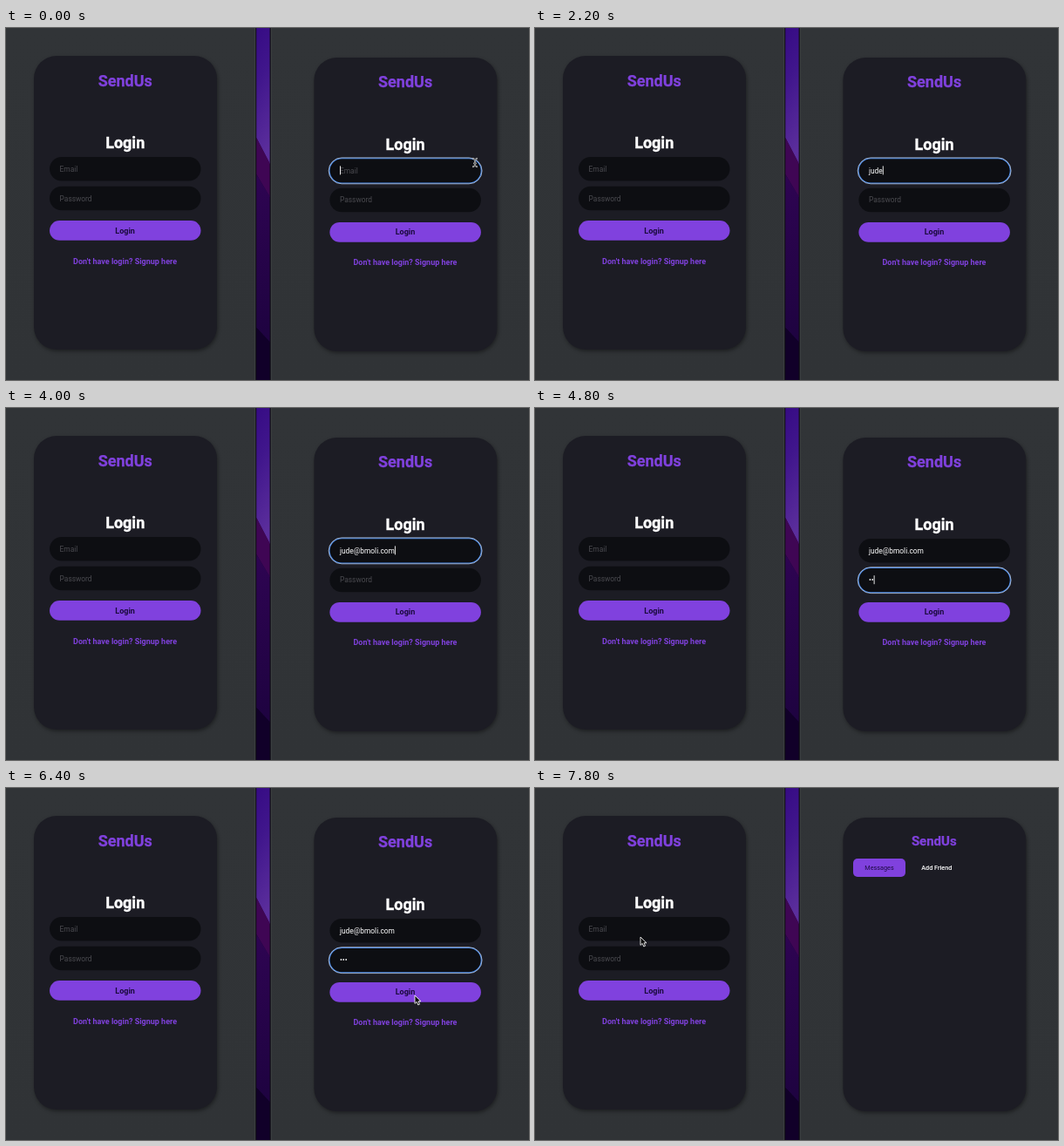
An HTML page for the animation above (8 s loop, 600x404 px).

```html
<!DOCTYPE html>
<html lang="en">
<head>
<meta charset="utf-8">
<title>Login</title>
<style>
  html, body { margin: 0; width: 100%; height: 100%; overflow: hidden; background: #303336; }
  svg { display: block; width: 600px; height: 404px; font-family: Roboto, Arial, sans-serif; }
  .mid { text-anchor: middle; }
  .bold { font-weight: 700; }
  .brand { fill: #8041de; font-size: 18px; stroke: #8041de; stroke-width: .25px; }
  .title { fill: #fff; font-size: 18px; stroke: #fff; stroke-width: .35px; }
  .label { fill: #190a3c; font-size: 9px; }
  .link { fill: #8041de; font-size: 9px; }
  .field { font-size: 8.4px; fill: #fff; }
  .field.empty { fill: #4b4b50; }
  .card { fill: #1c1c24; filter: drop-shadow(1px 2px 2px #0006); }
  .box { fill: #0d0e12; }
  .btn { fill: #8041de; }
  .tab { font-size: 7.25px; }
  .ring rect { fill: none; }
</style>
</head>
<body>
<svg viewBox="0 0 600 404">
  <defs>
    <linearGradient id="grey" x2="0" y2="1">
      <stop offset="0" stop-color="#313437"/>
      <stop offset="1" stop-color="#303336"/>
    </linearGradient>
    <linearGradient id="glow" x2=".15" y2="1">
      <stop offset="0" stop-color="#360b84"/>
      <stop offset=".4" stop-color="#40168c"/>
      <stop offset="1" stop-color="#5b2e9c"/>
    </linearGradient>
    <linearGradient id="dusk" x2="0" y2="1">
      <stop offset="0" stop-color="#2e0452"/>
      <stop offset="1" stop-color="#1e0340"/>
    </linearGradient>
  </defs>

  <rect width="600" height="404" fill="url(#grey)"/>
  <g id="wallpaper">
    <rect x="286" width="18" height="404" fill="#0c0a12"/>
    <path d="M287.3 0H302.6V156L287.3 126Z" fill="url(#glow)"/>
    <path d="M287.3 126L302.6 155V194L287.3 168Z" fill="#3f0654"/>
    <path d="M287.3 168L302.6 193V361L287.3 344Z" fill="url(#dusk)"/>
    <path d="M287.3 344L302.6 360V404H287.3Z" fill="#110029"/>
    <path d="M285.8 0V404M304.2 0V404" stroke="#45484a" stroke-width=".8"/>
  </g>

  <g id="left"></g>
  <g id="right" transform="translate(321.4 1.9)"></g>
  <g id="home">
    <text class="mid bold brand" x="457.8" y="65.5" style="font-size:15px">SendUs</text>
    <rect class="btn" x="365" y="81" width="60" height="21" rx="5"/>
    <text class="mid tab" x="395" y="94.3" fill="#1d0c45">Messages</text>
    <text class="mid tab" x="460.8" y="94.3" fill="#fff" font-weight="500">Add Friend</text>
  </g>

  <g id="beam" fill="none" stroke-linecap="round">
    <path id="bar" d="M-2.2 -4.8L0 -3.4L2.2 -4.8M0 -3.4V3.4M-2.2 4.8L0 3.4L2.2 4.8M-1.2 .8H1.2"/>
    <use href="#bar" stroke="#d8d8d8" stroke-width="1.7"/>
    <use href="#bar" stroke="#222" stroke-width=".6"/>
  </g>
  <path id="arrow" d="M0 0V9.4L2.2 7.4L3.8 11L5.5 10.2L4 6.8H7Z" fill="#0a0a0a" stroke="#f4f4f4" stroke-width=".9" stroke-linejoin="round"/>
</svg>

<script>
const LOOP = 8000, TICK = 200;
const EMAIL = 'jude@bmoli.com';
const ENTER = 6600; // the signed-in view replaces the form
const $ = id => document.getElementById(id);

const pill = (attrs, y, h, grow = 0) => `
  <rect ${attrs} x="${50 - grow}" y="${y - grow}" width="${173.5 + 2 * grow}"
    height="${h + 2 * grow}" rx="${h / 2 + grow}"/>`;

const field = (y, hint) => `
  ${pill('class="box"', y, 27.5)}
  <text class="field empty" x="61.6" y="${y + 16.8}">${hint}</text>`;

const card = '<rect class="card" x="32" y="32" width="210" height="337" rx="26"/>';

const form = `
  <text class="mid bold brand" x="136.7" y="66.6">SendUs</text>
  <text class="mid bold title" x="136.7" y="138">Login</text>
  ${field(148, 'Email')}${field(181.8, 'Password')}
  ${pill('class="btn"', 221.1, 22.7)}
  <text class="mid bold label" x="136.6" y="235.5">Login</text>
  <text class="mid bold link" x="136.6" y="270.5">Don't have login? Signup here</text>`;

const ring = `
  <g class="ring" id="ring">
    ${pill('stroke="#3f84e8" stroke-width="1.1"', 148.2, 27.5, .4)}
    ${pill('stroke="#cfe0fa" stroke-width=".7"', 148.2, 27.5, 1.2)}
  </g>
  <rect id="caret" width=".9" height="10" fill="#fff"/>`;

$('left').innerHTML = card + form;
$('right').innerHTML = card + `<g id="form">${form}${ring}</g>`;
const [mail, pass] = $('form').querySelectorAll('.field');

// Latest value in a list of [time, value] steps.
const at = (steps, t) => steps.reduce((v, [time, next]) => t >= time ? next : v, steps[0][1]);

const mailSteps = [[0, 0], [1400, 1], [1600, 2], [2000, 3], [2200, 4], [2600, 5],
  [2800, 6], [3000, 7], [3200, 9], [3400, 10], [3600, 12], [3800, 14]];
const passSteps = [[0, 0], [4600, 1], [4800, 2], [5200, 3]];
const caretSteps = [[0, 1], [400, 0], [1000, 1], [5800, 0]];

// Eased pointer moves between [time, x, y] stops.
const stops = [[5600, 505, 172], [6000, 475.7, 190.5], [6400, 469, 238],
  [6800, 469, 238], [7800, 121, 171]];

function pointerAt(t) {
  if (t < 200) return ['beam', 538, 154.5];
  if (t < 5800) return null;
  const i = Math.max(1, stops.findIndex(s => s[0] >= t));
  const [a, b] = [stops[i - 1], stops[i]];
  const p = (t - a[0]) / (b[0] - a[0]);
  const k = p * p * (3 - 2 * p);
  const mix = n => a[n] + (b[n] - a[n]) * k;
  return [t < 6200 ? 'beam' : 'arrow', mix(1), mix(2)];
}

function setField(el, value, hint) {
  el.textContent = value || hint;
  el.classList.toggle('empty', !value);
  return value ? el.getComputedTextLength() : 0;
}

const show = (el, on) => el.setAttribute('visibility', on ? 'visible' : 'hidden');

function draw(time) {
  const t = Math.floor(time % LOOP / TICK) * TICK;
  const inside = t >= ENTER;
  $('form').style.display = inside ? 'none' : '';
  $('home').style.display = inside ? '' : 'none';

  if (!inside) {
    const onPass = t >= 4200;
    const mailWidth = setField(mail, EMAIL.slice(0, at(mailSteps, t)), 'Email');
    const passWidth = setField(pass, '•'.repeat(at(passSteps, t)), 'Password');
    const drop = onPass ? 33.8 : 0;
    $('ring').setAttribute('transform', `translate(0 ${drop})`);
    $('caret').setAttribute('x', 61.6 + (onPass ? passWidth : mailWidth));
    $('caret').setAttribute('y', 156.5 + drop);
    $('caret').setAttribute('opacity', at(caretSteps, t));
  }

  const pointer = pointerAt(t);
  for (const kind of ['beam', 'arrow']) show($(kind), pointer && pointer[0] === kind);
  if (pointer) $(pointer[0]).setAttribute('transform', `translate(${pointer[1]} ${pointer[2]})`);
}

const start = performance.now();
function loop() {
  draw(performance.now() - start);
  requestAnimationFrame(loop);
}
loop();
</script>
</body>
</html>
```
